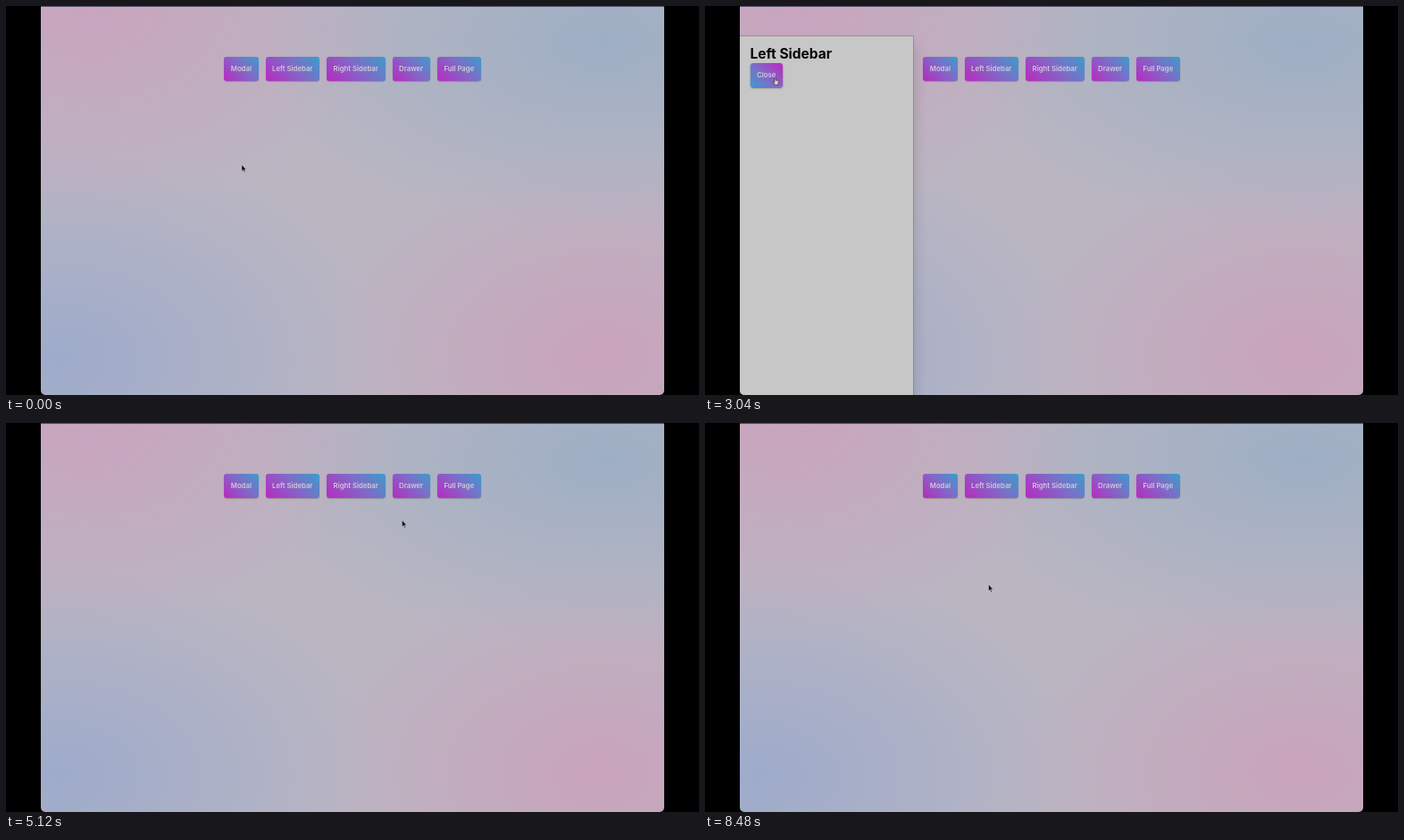
Recreate the animation shown at these times as an HTML page. Size 776 by 436 pixels, loop 8560 ms.

```html
<!DOCTYPE html>
<html lang="en">
<head>
<meta charset="utf-8">
<title>Dialogs</title>
<style>
  html, body { margin: 0; width: 100%; height: 100%; overflow: hidden; background: #000; }
  body { position: relative; font-family: Inter, sans-serif; }
  #stage {
    position: absolute; left: 39px; top: 0; width: 698px; height: 436px;
    overflow: hidden; border-radius: 0 0 5px 5px;
    background:
      radial-gradient(340px 240px at 55px 0, #c9a4be, transparent),
      radial-gradient(400px 210px at 631px 40px, #9eafc4, transparent),
      radial-gradient(330px 230px at 628px 393px, #c9a3bb, transparent),
      radial-gradient(360px 240px at 20px 395px, #9eabcb, transparent),
      #bab6c2;
  }
  #stage::after {
    content: ""; position: absolute; z-index: 9; inset: 0 0 auto; height: 1px;
    background: rgba(45, 45, 70, .7);
  }
  nav {
    position: absolute; top: 56.5px; width: 100%;
    display: flex; justify-content: center; gap: 8px;
  }
  .button {
    box-sizing: border-box; height: 27.2px; padding: 0 7.6px; width: max-content;
    border-radius: 3px; background: linear-gradient(45deg, #b929c0, #7f6bc8 55%, #3b9dcb);
    box-shadow: 0 .5px 1px rgba(0, 0, 0, .4);
    font-size: 7.75px; font-weight: 600; line-height: 27.2px; color: #d0c9d6;
  }
  .button.hover {
    background: linear-gradient(45deg, #3b9dcb, #7f6bc8 45%, #b929c0);
    box-shadow: 0 1px 2px rgba(0, 0, 0, .5);
  }
  .button span { position: relative; }
  .closing nav span { z-index: 2; color: #c7c7c7; }
  #backdrop {
    position: absolute; inset: 0; z-index: 1;
    background: rgba(0, 0, 0, .51); backdrop-filter: blur(.8px);
  }
  .closing #backdrop { backdrop-filter: none; }
  .panel {
    position: absolute; z-index: 3; box-sizing: border-box; padding: 11px 11.5px;
    background: #c7c7c7;
    box-shadow: 0 0 0 .5px #77777f, 0 10px 15px rgba(0, 0, 0, .18);
  }
  .panel h1 { margin: 0; font-size: 15.5px; line-height: 18.6px; font-weight: 700; color: #06060a; white-space: nowrap; }
  #modal { left: 192.5px; top: 101px; width: 313.5px; height: 235px; border-radius: 4px; }
  #left { left: 0; top: 34px; width: 194px; height: 402px; }
  #right { right: 0; top: 0; width: 194px; height: 436px; }
  #drawer { left: 479.5px; top: 219px; width: 194px; height: 217px; }
  #full { inset: 0; padding: 8px 6px; }
  #cursor { position: absolute; z-index: 10; left: 0; top: 0; overflow: visible; }
  #cursor path { stroke-linejoin: round; }
</style>
</head>
<body>
<div id="stage">
  <nav></nav>
  <div id="backdrop"></div>
</div>
<svg id="cursor" width="10" height="10">
  <path id="arrow" d="M0 0V7.2L1.6 5.8 2.8 8.4 3.9 7.9 2.7 5.4H5Z" fill="#08080a" stroke="#c7c7c7" stroke-width=".5"/>
  <path id="hand" d="M-.6 .6Q0-.3.7.6L1.2 3.2Q2 2.7 2.5 3.4 3.3 3 3.6 3.8 4.5 3.7 4.5 4.7L4 7.1 3.5 8.5H.4L-1.8 5.3Q-1.7 4.4-.7 4.9L0 5.4Z" fill="#d0d0d0" stroke="#222" stroke-width=".6"/>
</svg>
<script>
const LOOP = 8560, STEP = 80, FADE = 200;

// Modal dialogs dim the page and are dismissed by clicking outside.
const dialogs = [
  { id: "modal", title: "Modal", open: 520, close: 1340, modal: true },
  { id: "left", title: "Left Sidebar", open: 2080, close: 3200 },
  { id: "right", title: "Right Sidebar", open: 3800, close: 4790, modal: true },
  { id: "drawer", title: "Drawer", open: 5480, close: 6420 },
  { id: "full", title: "Full Page", open: 7200, close: 7840, covers: true },
];

// Pointer moves: start time, end time, destination.
const pointerStart = [264, 178];
const moves = [
  [0, 480, 262, 72],
  [640, 1120, 196.5, 86],
  [1400, 1920, 320, 72],
  [2360, 2880, 78, 80],
  [3280, 3760, 392, 72],
  [4240, 4480, 429, 166],
  [4800, 5360, 453, 72],
  [5760, 6320, 539, 250],
  [6480, 7120, 502.5, 74],
  [7400, 7760, 63, 40],
  [8000, 8480, 317.5, 181],
];

const $ = id => document.getElementById(id);
const stage = $("stage"), nav = document.querySelector("nav");
const clamp = v => Math.min(1, Math.max(0, v));
const easeOut = v => 1 - (1 - v) ** 3;
const smooth = v => v * v * (3 - 2 * v);

function addButton(parent, label) {
  const button = document.createElement("div");
  button.className = "button";
  button.innerHTML = `<span>${label}</span>`;
  return parent.appendChild(button);
}

for (const d of dialogs) {
  d.trigger = addButton(nav, d.title);
  d.panel = document.createElement("section");
  d.panel.id = d.id;
  d.panel.className = "panel";
  d.panel.innerHTML = `<h1>${d.title}</h1>`;
  stage.append(d.panel);
  if (!d.modal) d.closer = addButton(d.panel, "Close");
}

const opacity = (d, t) =>
  easeOut(clamp((t - d.open) / FADE)) * (1 - clamp((t - d.close) / FADE));

function pointerAt(t) {
  let [x, y] = pointerStart;
  for (const [start, end, toX, toY] of moves) {
    const k = smooth(clamp((t - start) / (end - start)));
    x += (toX - x) * k;
    y += (toY - y) * k;
  }
  return [x, y];
}

function buttonAt(t) {
  const [x, y] = pointerAt(t);
  const covered = dialogs.some(d => (d.modal || d.covers) && opacity(d, t) === 1);
  const reachable = dialogs
    .filter(d => d.closer && opacity(d, t) > .5).map(d => d.closer)
    .concat(covered ? [] : dialogs.map(d => d.trigger));
  return reachable.find(button => {
    const r = button.getBoundingClientRect();
    return x >= r.left && x <= r.right && y >= r.top && y <= r.bottom;
  });
}

function render(t) {
  let dim = 0, closing = false;
  const hovered = buttonAt(t - STEP);
  for (const d of dialogs) {
    const a = opacity(d, t);
    d.panel.style.opacity = a;
    d.panel.style.visibility = a ? "visible" : "hidden";
    if (d.modal) {
      dim = Math.max(dim, a);
      closing ||= a > 0 && t > d.close;
    }
    for (const b of [d.trigger, d.closer]) b?.classList.toggle("hover", b === hovered);
  }
  $("backdrop").style.opacity = dim;
  $("backdrop").style.visibility = dim ? "visible" : "hidden";
  stage.classList.toggle("closing", closing);

  const [x, y] = pointerAt(t), pointing = !!buttonAt(t);
  $("cursor").style.transform = `translate(${x}px, ${y}px)`;
  $("hand").style.display = pointing ? "" : "none";
  $("arrow").style.display = pointing ? "none" : "";
}

const begin = performance.now();
function frame() {
  const t = (performance.now() - begin) % LOOP;
  render(Math.floor(t / STEP) * STEP);
  requestAnimationFrame(frame);
}
frame();
</script>
</body>
</html>
```
